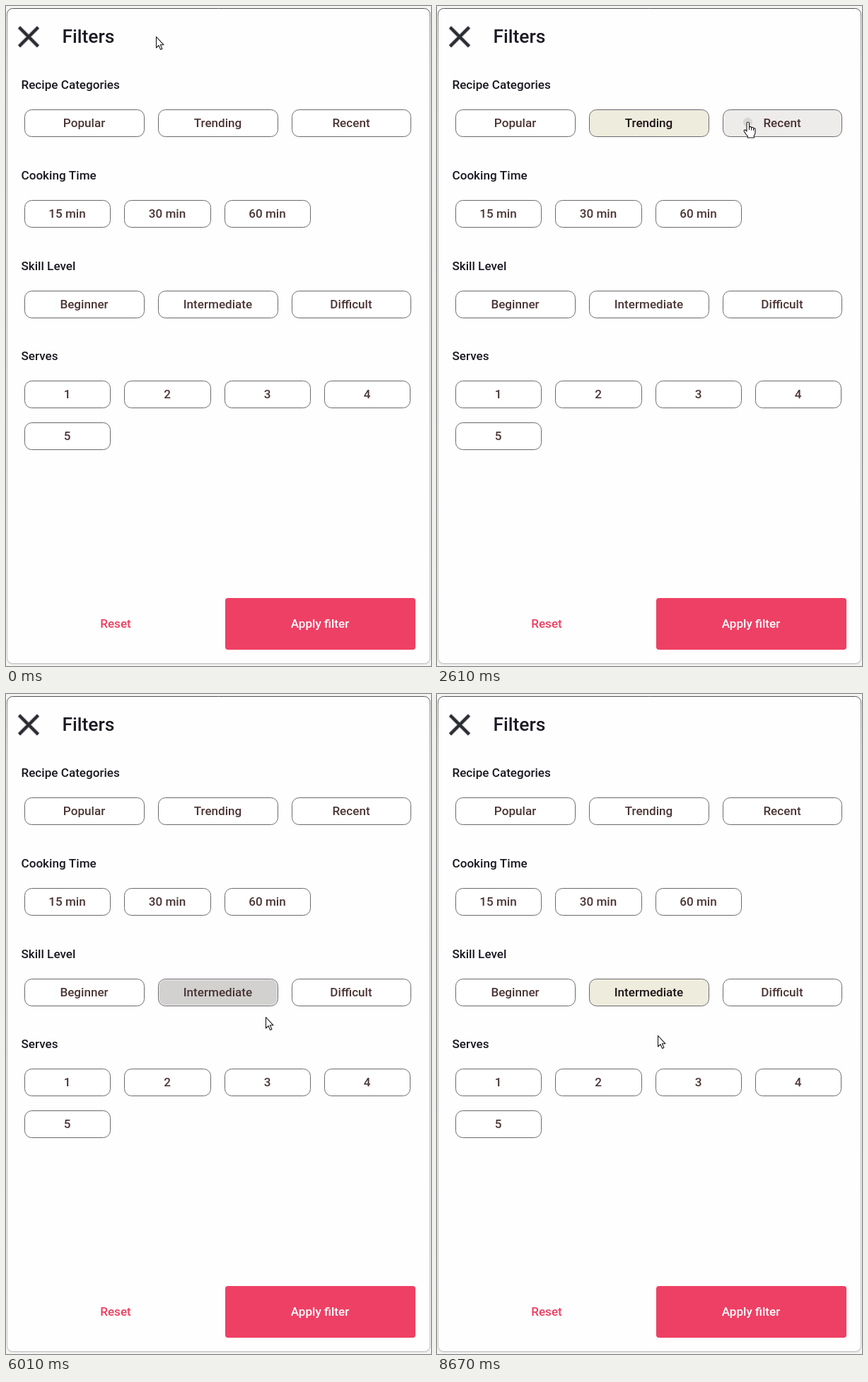
An HTML page with a canvas that plays this animation: 601 by 932 pixels, repeating every 9.47 s.

```html
<!DOCTYPE html>
<html lang="en">
<head>
<meta charset="utf-8">
<title>Recipe filters</title>
<style>
  html, body { margin: 0; width: 100%; height: 100%; overflow: hidden; background: #f4f4f5; }
  canvas { display: block; width: 601px; height: 932px; }
</style>
</head>
<body>
<canvas id="stage"></canvas>
<script>
const W = 601, H = 932, LOOP = 9470;
const FONT = 'Roboto, Arial, sans-serif';
const WHITE = [255, 255, 255], SELECTED = [238, 236, 221], BROWN = [75, 53, 53], INK = [28, 18, 20];
const canvas = document.getElementById('stage');
const ctx = canvas.getContext('2d');
const dpr = window.devicePixelRatio || 1;
canvas.width = W * dpr;
canvas.height = H * dpr;

const clamp = v => Math.max(0, Math.min(1, v));
const smooth = u => u * u * (3 - 2 * u);
const ramp = (t, start, span) => smooth(clamp((t - start) / span));
const mix = (a, b, u) => a.map((v, k) => v + (b[k] - v) * u);
const rgb = c => `rgb(${c.map(Math.round).join()})`;
const snap = v => Math.floor(v) + 0.5;

const headings = [], buttons = [];
function addRow(y, labels, pitch, w, title) {
  if (title) headings.push({ title, y: y - 29.5 });
  labels.forEach((label, i) => {
    const left = 26.4 + i * pitch, x = snap(left);
    buttons.push({ label, x, y, w: snap(left + w) - x, h: 38, visits: [], changes: [] });
  });
}
addRow(146.5, ['Popular', 'Trending', 'Recent'], 188.9, 168.7, 'Recipe Categories');
addRow(274.5, ['15 min', '30 min', '60 min'], 141.3, 121.3, 'Cooking Time');
addRow(402.5, ['Beginner', 'Intermediate', 'Difficult'], 188.9, 168.7, 'Skill Level');
addRow(529.5, ['1', '2', '3', '4'], 141.3, 121.3, 'Serves');
addRow(588.5, ['5'], 141.3, 121.3);

// Pointer stops: time, x, y
const path = [
  [0, 212, 43], [150, 185, 10], [300, 162, 60], [450, 204, 140], [600, 206, 188],
  [900, 320, 200], [1030, 320, 200], [1130, 321, 166], [1400, 321, 166], [1960, 324, 231],
  [2200, 360, 255], [2560, 438, 164], [2610, 440, 164], [2750, 442, 168],
  [2910, 440, 272], [2990, 440, 272], [3440, 452, 167], [3670, 456, 169], [3930, 466, 361],
  [4200, 398, 385], [4420, 394, 410], [4620, 394, 410], [4800, 348, 422], [5200, 344, 500],
  [5480, 330, 426], [5740, 330, 426], [5860, 338, 430], [6010, 367, 456], [6230, 440, 528],
  [6580, 479, 431], [7200, 470, 428], [7650, 307, 424], [8000, 309, 425], [8610, 312, 482]
];
const clicks = [1135, 2590, 3560, 4800, 5740, 6590, 7750];

// Monotone cubic interpolation, so pauses stay still
function pointerAt(t) {
  let i = 0;
  while (i < path.length - 2 && t >= path[i + 1][0]) i++;
  const a = path[i], b = path[i + 1], dt = b[0] - a[0], u = clamp((t - a[0]) / dt);
  const slope = (k, c) => k < 0 || k > path.length - 2 ? 0
    : (path[k + 1][c] - path[k][c]) / (path[k + 1][0] - path[k][0]);
  const tangent = (k, c) => {
    const p = slope(k - 1, c), q = slope(k, c);
    return p * q > 0 ? 2 * p * q / (p + q) : 0;
  };
  return [1, 2].map(c => a[c] + (b[c] - a[c]) * smooth(u)
    + dt * u * (1 - u) * ((1 - u) * tangent(i, c) - u * tangent(i + 1, c)));
}

const buttonAt = ([x, y]) =>
  buttons.find(b => x >= b.x && x <= b.x + b.w && y >= b.y && y <= b.y + b.h);

// Derive hover spans from the pointer path
for (let t = 0, last; t < LOOP; t += 5) {
  const b = buttonAt(pointerAt(t));
  if (b && b !== last) b.visits.push({ enter: t });
  if (b) b.visits[b.visits.length - 1].leave = t;
  last = b;
}

// A click toggles its button and clears the previous choice
let chosen;
const ripples = clicks.map(start => {
  const [x, y] = pointerAt(start), b = buttonAt([x, y]);
  if (chosen) chosen.changes.push({ start, on: false });
  chosen = chosen === b ? undefined : b;
  if (chosen) chosen.changes.push({ start, on: true });
  return { b, start, x, y };
});

function selection(b, t) {
  const last = b.changes.filter(c => c.start <= t).pop();
  if (!last) return 0;
  return last.on ? ramp(t, last.start + 10, 70) : 1 - ramp(t, last.start + 100, 200);
}

const hover = (b, t) =>
  Math.max(0, ...b.visits.map(v => ramp(t, v.enter, 220) * (1 - ramp(t, v.leave, 220))));

function box(x, y, w, h, r) {
  ctx.beginPath();
  ctx.roundRect(x, y, w, h, r);
}

function text(str, x, y, color, align = 'left', size = 17.1) {
  ctx.font = `500 ${size}px ${FONT}`;
  ctx.textAlign = align;
  ctx.fillStyle = color;
  ctx.fillText(str, x, y);
}

function drawCard() {
  ctx.fillStyle = '#f4f4f5';
  ctx.fillRect(0, 0, W, H);
  box(1, 4, 599, 926, 8);
  ctx.fillStyle = '#dededf';
  ctx.fill();
  box(1.5, 3.5, 598, 925, 8);
  ctx.fillStyle = '#fefefe';
  ctx.fill();
  const edge = ctx.createLinearGradient(0, 3, 0, 929);
  edge.addColorStop(0, '#505054');
  edge.addColorStop(0.015, '#8e8e92');
  edge.addColorStop(0.1, '#a9a9ac');
  edge.addColorStop(1, '#c4c4c7');
  ctx.strokeStyle = edge;
  ctx.lineWidth = 1;
  ctx.stroke();
}

function drawClose() {
  const cross = new Path2D('M18.5 30 45.5 57M45.5 30 18.5 57');
  ctx.strokeStyle = 'rgba(70,72,80,.3)';
  ctx.lineWidth = 6.2;
  ctx.stroke(cross);
  ctx.strokeStyle = '#2b2d32';
  ctx.lineWidth = 4;
  ctx.stroke(cross);
}

function drawRipple({ b, start, x, y }, t) {
  const age = t - start;
  if (age < 0 || age > 640) return;
  const far = Math.hypot(Math.max(x - b.x, b.x + b.w - x), Math.max(y - b.y, b.y + b.h - y));
  const grow = smooth(Math.pow(clamp(age / 340), 0.75));
  ctx.save();
  box(b.x + 1.5, b.y + 1.5, b.w - 3, b.h - 3, 8.5);
  ctx.clip();
  ctx.beginPath();
  ctx.arc(x, y, far * 1.15 * grow, 0, Math.PI * 2);
  ctx.fillStyle = `rgba(0,0,0,${(0.09 + 0.04 * grow) * (1 - ramp(age, 340, 300))})`;
  ctx.fill();
  ctx.restore();
}

function drawButton(b, t) {
  const on = selection(b, t);
  const fill = mix(mix(WHITE, SELECTED, on), BROWN, hover(b, t) * (0.1 + 0.1 * on));
  box(b.x, b.y, b.w, b.h, 10);
  ctx.fillStyle = rgb(fill);
  ctx.fill();
  ripples.filter(r => r.b === b).forEach(r => drawRipple(r, t));
  box(b.x, b.y, b.w, b.h, 10);
  ctx.strokeStyle = '#6c686e';
  ctx.lineWidth = 1;
  ctx.stroke();
  text(b.label, b.x + b.w / 2 - 0.5, b.y + 24, rgb(mix(BROWN, INK, on)), 'center');
}

const arrow = new Path2D('M.5 .5V16L4 12.7 6.5 18.4 8.9 17.4 6.4 11.8H11Z');
const hand = new Path2D('M-2 1.8Q-2 0 -.3 0T1.5 1.8V7.2Q2 6.2 3.2 6.4T4.6 7.9'
  + 'Q5.2 7 6.4 7.3T7.6 8.9Q8.2 8.2 9.2 8.6T10 10.4V15Q10 17.2 8.3 19V22H-.7V19.7'
  + 'Q-3.2 17.5 -5.7 13Q-6.3 11.3 -5.1 10.9T-2 13Z');
const knuckles = new Path2D('M1.5 7V11M4.6 8V11.5M7.6 9V12');

function drawPointer(t) {
  const point = pointerAt(t), over = buttonAt(point);
  const shape = over ? hand : arrow;
  ctx.save();
  ctx.translate(...point.map(Math.round));
  ctx.lineJoin = 'round';
  ctx.lineWidth = 1.1;
  ctx.fillStyle = '#fff';
  ctx.strokeStyle = '#17171c';
  ctx.fill(shape);
  ctx.stroke(shape);
  if (over) ctx.stroke(knuckles);
  ctx.restore();
}

function draw(t) {
  ctx.setTransform(dpr, 0, 0, dpr, 0, 0);
  drawCard();
  drawClose();
  text('Filters', 79.5, 52, '#1c1922', 'left', 26.4);
  headings.forEach(h => text(h.title, 21.5, h.y, '#1a1720'));
  buttons.forEach(b => drawButton(b, t));
  box(310, 836, 269, 73, 4);
  ctx.fillStyle = '#ee4065';
  ctx.fill();
  text('Apply filter', 444, 878, '#fff', 'center');
  text('Reset', 155, 878, '#ef3d60', 'center');
  drawPointer(t);
}

const begin = performance.now();
function tick() {
  draw((performance.now() - begin) % LOOP);
  requestAnimationFrame(tick);
}
tick();
</script>
</body>
</html>
```
